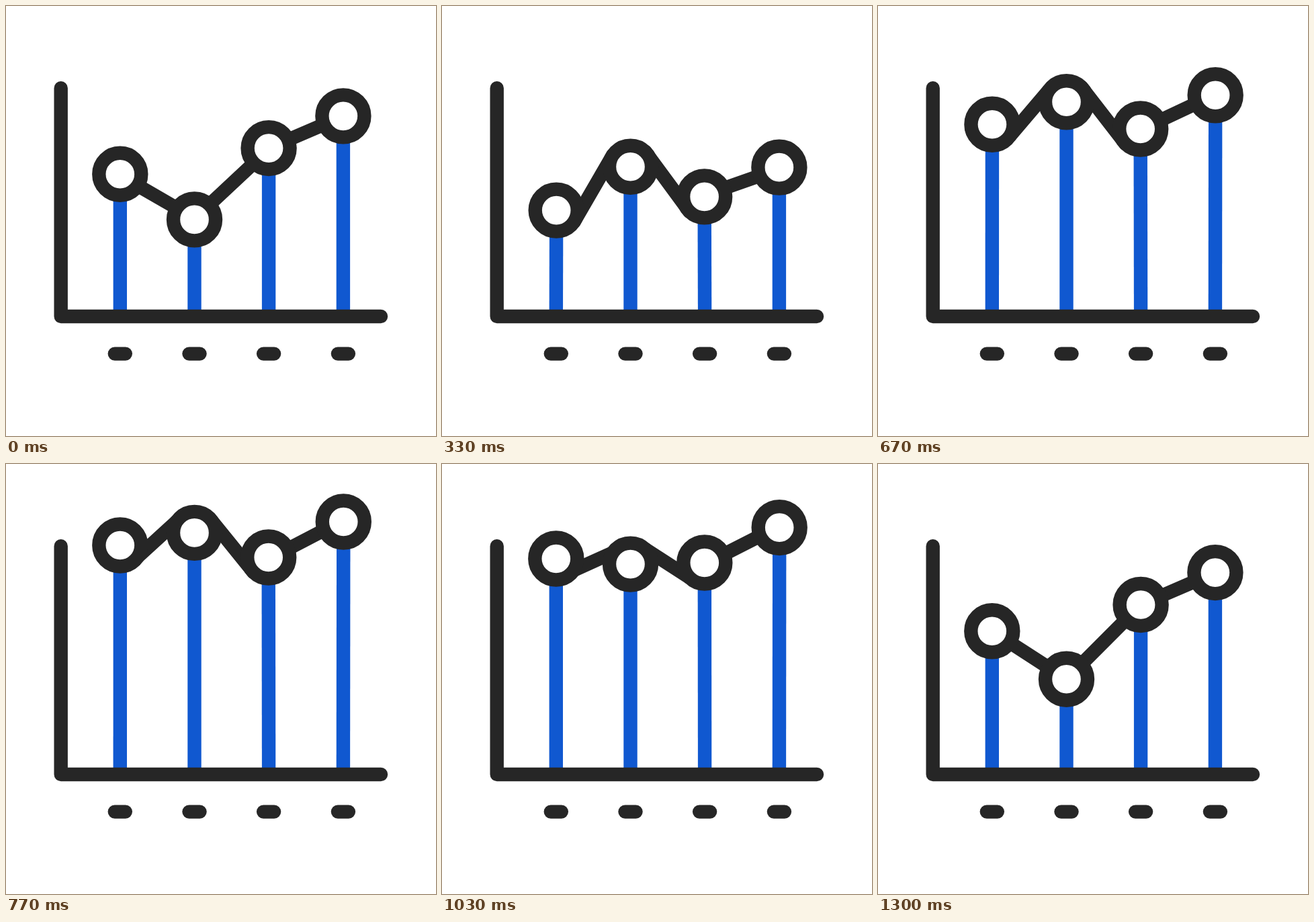
Animation, 640 px wide and 640 px high, one loop 1670 ms. Source, as an HTML page with a canvas:

```html
<!DOCTYPE html>
<html lang="en">
<head>
<meta charset="utf-8">
<title>Line chart</title>
<style>
  html, body { margin: 0; height: 100%; overflow: hidden; background: #fff; }
  canvas { display: block; width: 100vw; height: 100vh; }
</style>
</head>
<body>
<canvas width="640" height="640"></canvas>
<script>
const ctx = document.querySelector('canvas').getContext('2d');
const DARK = '#262626', BLUE = '#1058d0';
const LOOP = 1670, FPS = 30, WIDTH = 20.4, RADIUS = 31.5, BASE = 462;

// Poses of the four data points
const rest = [[169.8, 248.7], [280.5, 320.2], [391.1, 209.5], [501.9, 161.6]];
const low  = [[170.2, 305.7], [280.5, 236.9], [390.6, 286.0], [501.9, 242.4]];
const high = [[169.8, 103.8], [280.5, 89.9], [390.7, 125.3], [502.3, 71.4]];

// Start and end in steps, ease strength, poses
const moves = [
  [-1.7, 11.7, 0.46, rest, low],
  [11.7, 26, 0.44, low, high],
  [26, 39, 0.57, high, rest],
];

// cubic-bezier(a, 0, 1 - a, 1), solved by bisection
function ease(x, a) {
  let lo = 0, hi = 1, s = 0.5;
  for (let i = 0; i < 24; i++) {
    s = (lo + hi) / 2;
    const bx = 3 * a * s * (1 - s) ** 2 + 3 * (1 - a) * s * s * (1 - s) + s ** 3;
    if (bx < x) lo = s; else hi = s;
  }
  return s * s * (3 - 2 * s);
}

function poseAt(step) {
  const [start, end, a, from, to] = moves.find(m => step < m[1]) || moves[2];
  const p = step >= end ? 1 : ease((step - start) / (end - start), a);
  return from.map(([x, y], i) => [x + (to[i][0] - x) * p, y + (to[i][1] - y) * p]);
}

// Each link is pinned to the rings where it leaves them at rest
const pins = rest.slice(1).map(([x, y], i) => {
  const dx = x - rest[i][0], dy = y - rest[i][1], k = RADIUS / Math.hypot(dx, dy);
  return [dx * k, dy * k];
});

function line(color, cap, ...points) {
  ctx.strokeStyle = color;
  ctx.lineCap = cap;
  ctx.beginPath();
  points.forEach(p => ctx.lineTo(...p));
  ctx.stroke();
}

function draw(now) {
  const step = Math.floor((now % LOOP + 4) * FPS / 1000);
  const points = poseAt(step);
  ctx.fillStyle = '#fff';
  ctx.fillRect(0, 0, 640, 640);
  ctx.lineWidth = WIDTH;
  ctx.lineJoin = 'round';

  points.forEach((p, i) => line(BLUE, 'butt', p, [rest[i][0], BASE]));
  pins.forEach(([dx, dy], i) => {
    const [x1, y1] = points[i], [x2, y2] = points[i + 1];
    line(DARK, 'round', [x1 + dx, y1 + dy], [x2 - dx, y2 - dy]);
  });
  points.forEach(([x, y]) => {
    ctx.beginPath();
    ctx.arc(x, y, RADIUS, 0, Math.PI * 2);
    ctx.fill();
    ctx.stroke();
  });
  line(DARK, 'round', [81.7, 122.3], [81.7, BASE], [558, BASE]);
  rest.forEach(([x]) => line(DARK, 'round', [x - 8, 517.6], [x + 8, 517.6]));
}

const begin = performance.now();
function tick() {
  draw(performance.now() - begin);
  requestAnimationFrame(tick);
}
tick();
</script>
</body>
</html>
```
